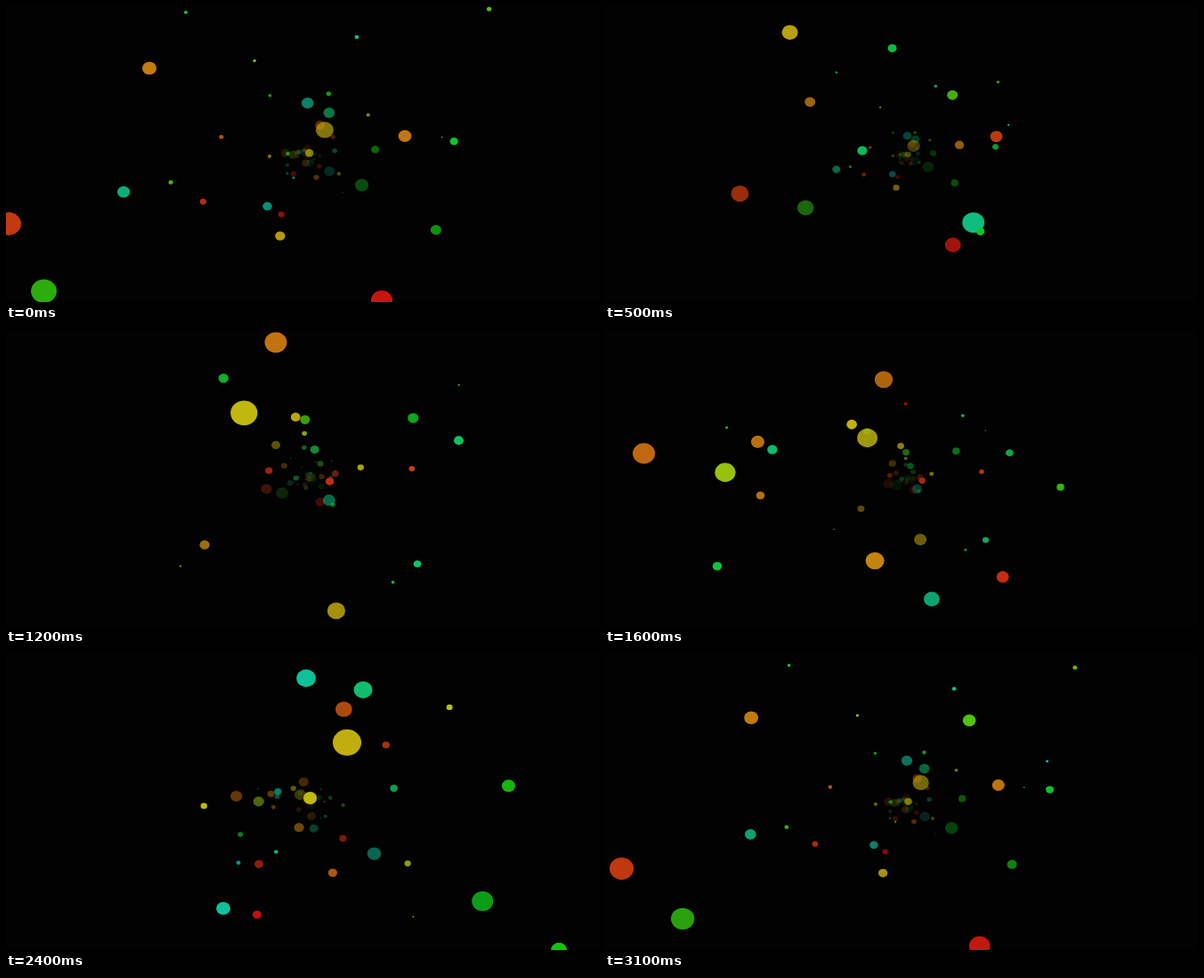
An HTML page with a canvas for the animation above (3.2 s loop, 666x333 px).

```html
<!DOCTYPE html>
<html lang="en">
<head>
<meta charset="utf-8">
<title>Dots falling inward</title>
<style>
  html, body { margin: 0; width: 100%; height: 100%; overflow: hidden; background: #030203; }
  canvas { display: block; }
</style>
</head>
<body>
<canvas id="stage" width="666" height="333"></canvas>
<script>
const LOOP = 3200, STEP = 100, LIFE = 3000, HOLD = 100;
const CENTER = { x: 340, y: 168 };
const DEPTH = 1.9;      // how far a dot recedes, in viewing distances
const FLATTEN = 0.92;   // dots are slightly wider than tall
const ctx = document.getElementById('stage').getContext('2d');

// Leading dots: start offset x, y from the centre, birth (ms), radius, hue.
const leading = [
  [-179, -98, 60, 8, 36], [-283, 56, 2670, 8.5, 160], [-405, 208, 2670, 17.5, 108],
  [-337, 77, 10, 14, 14], [82, 163, 65, 12, 3], [281, 165, 2460, 9, 118],
  [330, 186, 1940, 16.5, 125], [-3, -144, 2350, 11, 166], [66, -138, 2270, 11, 152],
  [51, -137, 2105, 11, 22], [44, -70, 2350, 16.3, 54], [-305, -30, 1540, 12.8, 30],
  [-211, -8, 1540, 11.8, 74], [274, -24, 2150, 8.6, 116], [270, 208, 1550, 15, 166],
  [-37, -154, 1265, 12.5, 33], [-74, -76, 1160, 15.3, 57], [-37, 92, 1590, 10.5, 39],
  [41, 205, 1200, 11.5, 160], [47, 225, 800, 13, 52], [-156, -163, 280, 10, 52],
  [79, 81, 380, 13, 158]
];

function seededRandom(seed) {
  return () => {
    seed = (seed * 1664525 + 1013904223) % 4294967296;
    return seed / 4294967296;
  };
}

const random = seededRandom(7);
const spread = size => (random() * 2 - 1) * size;
const small = Array.from({ length: 60 }, () =>
  [spread(220), spread(170), random() * LIFE, 1 + random() * 7, random() * 176]);

const dots = [...leading, ...small].map(([x, y, birth, radius, hue]) =>
  ({ x, y, birth, radius, color: `hsl(${hue} 86% 41%)` }));

// The CSS "ease" curve, cubic-bezier(.25, .1, .25, 1).
function ease(progress) {
  let low = 0, high = 1;
  for (let i = 0; i < 20; i++) {
    const mid = (low + high) / 2;
    if (0.75 * mid * (1 - mid) + mid ** 3 < progress) low = mid;
    else high = mid;
  }
  const s = low, r = 1 - s;
  return 0.3 * s * r * r + 3 * s * s * r + s ** 3;
}

function ageOf(dot, time) {
  return (time - dot.birth + HOLD + LIFE) % LIFE - HOLD;
}

function drawDot(dot, age) {
  const travel = ease(Math.max(0, age) / LIFE);
  const scale = 1 / (1 + DEPTH * travel);
  const reach = (1 - travel) * scale;
  const radius = dot.radius * scale;
  ctx.globalAlpha = 1 - travel;
  ctx.fillStyle = dot.color;
  ctx.beginPath();
  ctx.ellipse(CENTER.x + dot.x * reach, CENTER.y + dot.y * reach,
    radius, radius * FLATTEN, 0, 0, Math.PI * 2);
  ctx.fill();
}

function draw() {
  const time = Math.floor(performance.now() % LOOP / STEP) * STEP;
  ctx.globalAlpha = 1;
  ctx.fillStyle = '#030203';
  ctx.fillRect(0, 0, 666, 333);
  dots.map(dot => ({ dot, age: ageOf(dot, time) }))
    .sort((a, b) => b.age - a.age)
    .forEach(({ dot, age }) => drawDot(dot, age));
  requestAnimationFrame(draw);
}
draw();
</script>
</body>
</html>
```
